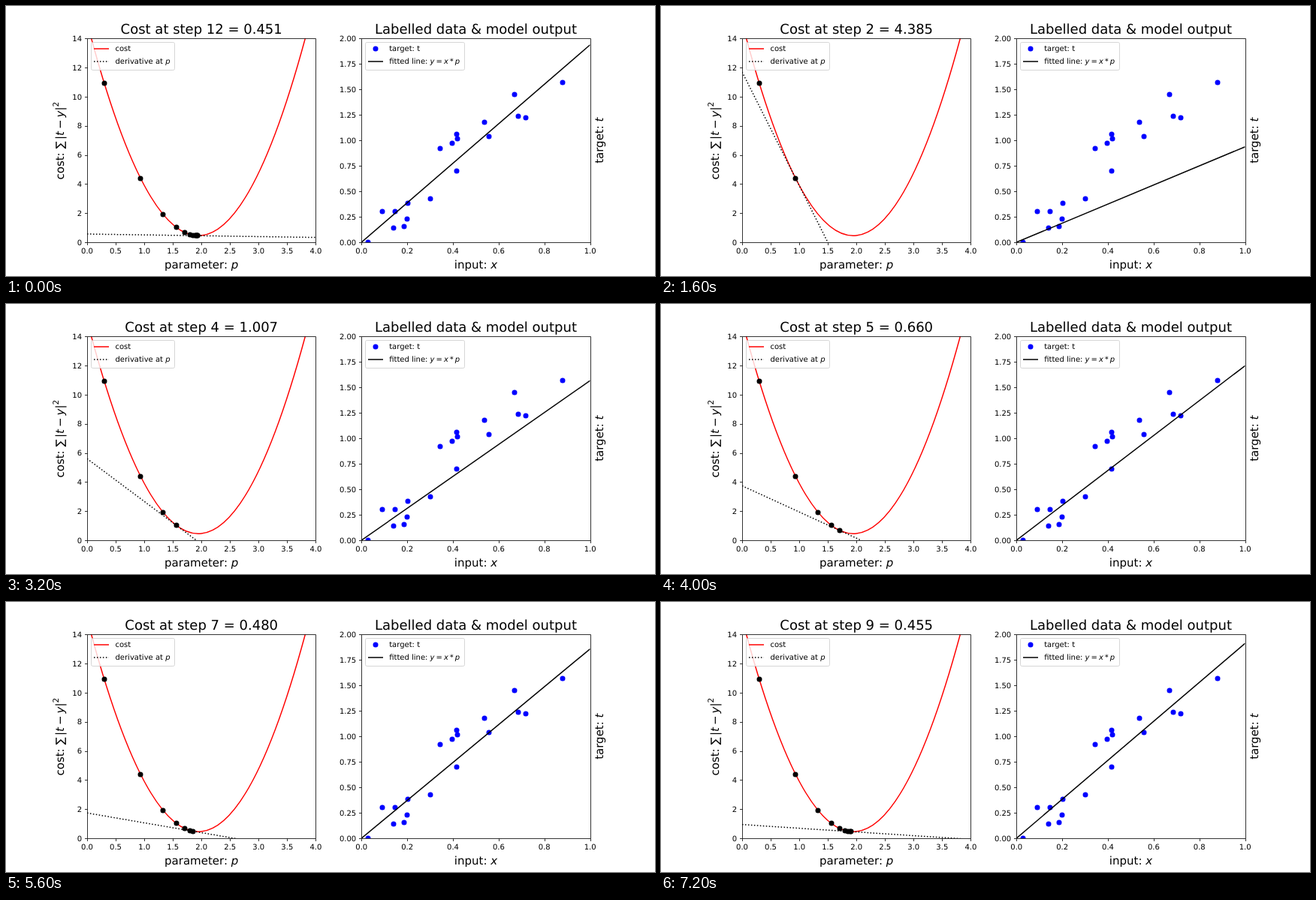
These frames come from a looping animation (864x360 px, 8000 ms). An HTML page:

```html
<!DOCTYPE html>
<html lang="en">
<head>
<meta charset="utf-8">
<title>Gradient descent</title>
<style>
  html, body { margin: 0; width: 100%; height: 100%; overflow: hidden; background: #fff; }
  svg { display: block; }
  text { font-family: "DejaVu Sans", sans-serif; font-size: 10px; text-rendering: geometricPrecision; white-space: pre; }
  .title { font-size: 18px; text-anchor: middle; }
  .label { font-size: 15px; }
  .mid { text-anchor: middle; }
  .end { text-anchor: end; }
  i, .it { font-style: italic; }
  .line { fill: none; stroke: #000; stroke-width: 1.5; }
  .red { stroke: #f00; }
  .dots { stroke-dasharray: 1.5 2.475; }
  .axis { fill: none; stroke: #000; stroke-width: .8; }
  .box { fill: #fff; fill-opacity: .8; stroke: #ccc; stroke-opacity: .8; }
</style>
</head>
<body>
<svg id="stage" width="864" height="360" viewBox="0 0 864 360"></svg>
<script>
const TOP = 43.2, BOTTOM = 315, WIDTH = 304.36;
const svg = document.getElementById("stage");

function add(parent, tag, attrs, text) {
  const el = document.createElementNS("http://www.w3.org/2000/svg", tag);
  for (const key in attrs) el.setAttribute(key, attrs[key]);
  if (text) el.textContent = text;
  parent.append(el);
  return el;
}

// Each part is [text, class, dx, dy, font size]
function rich(attrs, parts) {
  const el = add(svg, "text", attrs);
  for (const [text, cls = "", dx = 0, dy = 0, size] of parts) {
    const span = add(el, "tspan", { class: cls, dx, dy }, text);
    if (size) span.style.fontSize = size + "px";
  }
}

const dot = (parent, x, y, fill) =>
  add(parent, "circle", { cx: Math.round(x), cy: Math.round(y), r: 3.5, fill });

function makeAxes(id, left, xMax, yMax) {
  const clip = add(svg, "clipPath", { id });
  add(clip, "rect", { x: left, y: TOP, width: WIDTH, height: BOTTOM - TOP });
  return {
    left, xMax, yMax,
    x: v => left + v / xMax * WIDTH,
    y: v => BOTTOM - v / yMax * (BOTTOM - TOP),
    plot: add(svg, "g", { "clip-path": `url(#${id})` })
  };
}

const snap = v => Math.round(v) + .5;

function drawFrame(ax, xStep, yStep, yDigits) {
  const l = snap(ax.left), r = snap(ax.left + WIDTH), t = snap(TOP), b = snap(BOTTOM);
  let d = `M${l} ${t}H${r}V${b}H${l}Z`;
  for (let i = 0; i * xStep <= ax.xMax + 1e-6; i++) {
    const x = ax.x(i * xStep);
    d += `M${snap(x)} ${b}v3.5`;
    add(svg, "text", { x, y: 330, class: "mid" }, (i * xStep).toFixed(1));
  }
  for (let i = 0; i * yStep <= ax.yMax + 1e-6; i++) {
    const y = ax.y(i * yStep);
    d += `M${l} ${snap(y)}h-3.5`;
    add(svg, "text", { x: ax.left - 7, y: Math.round(y + 3.7), class: "end" }, (i * yStep).toFixed(yDigits));
  }
  add(svg, "path", { d, class: "axis" });
}

function legendBox(left, width) {
  add(svg, "rect", { x: left, y: 48.5, width, height: 37, rx: 2, class: "box" });
}

// Cost is C + A (p - BEST)^2, descended with a fixed rate
const C = .4509, A = 3.8696, BEST = 1.9448, START = .3, RATE = .05;
const cost = p => C + A * (p - BEST) ** 2;
const slope = p => 2 * A * (p - BEST);
const params = [START];
while (params.length < 12) {
  const p = params[params.length - 1];
  params.push(p - RATE * slope(p));
}

// Left chart
const left = makeAxes("clipL", 108, 4, 14);
add(left.plot, "path", {
  class: "line red",
  d: `M${left.x(0)} ${left.y(cost(0))}Q${left.x(2)} ${left.y(cost(0) + 2 * slope(0))} ${left.x(4)} ${left.y(cost(4))}`
});
const tangent = add(left.plot, "path", { class: "line dots" });
const visited = params.map(p => dot(left.plot, left.x(p), left.y(cost(p)), "#000"));
drawFrame(left, .5, 2, 0);
const title = add(svg, "text", { x: 260.2, y: 37, class: "title" });
rich({ x: 260.2, y: 350, class: "label mid" }, [["parameter: "], ["p", "it"]]);
rich({ transform: "translate(77 231.5) rotate(-90)", class: "label" }, [
  ["cost: ∑"], ["|", "", 2.5], ["t", "it"], ["−", "", 3], ["y", "it", 3], ["|"], ["2", "", 0, -7, 10.5]
]);
legendBox(113.5, 111);
add(svg, "path", { d: "M117 57h20", class: "line red" });
add(svg, "path", { d: "M117 74h20", class: "line dots" });
add(svg, "text", { x: 145.5, y: 60 }, "cost");
rich({ x: 145.5, y: 77 }, [["derivative at "], ["p", "it"]]);

// Right chart; samples are in stage pixels
const right = makeAxes("clipR", 473.24, 1, 2);
const samples = [
  [482, 315], [501, 274], [518, 274], [516, 296], [530, 294], [534, 284], [535, 263],
  [565, 257], [578, 190], [594, 183], [600, 171], [601, 177], [600, 220], [637, 155],
  [643, 174], [677, 118], [682, 147], [692, 149], [741, 102]
];
for (const [x, y] of samples) dot(right.plot, x, y, "#00f");
const fit = add(right.plot, "path", { class: "line" });
drawFrame(right, .2, .25, 2);
add(svg, "text", { x: 625.5, y: 37, class: "title" }, "Labelled data & model output");
rich({ x: 625.5, y: 350, class: "label mid" }, [["input: "], ["x", "it"]]);
rich({ transform: "translate(795 179.2) rotate(-90)", class: "label mid" }, [["target: "], ["t", "it"]]);
legendBox(478.5, 132);
dot(svg, 492, 57, "#00f");
add(svg, "path", { d: "M482 74h20", class: "line" });
add(svg, "text", { x: 510.2, y: 60 }, "target: t");
rich({ x: 510.2, y: 77 }, [
  ["fitted line: "], ["y", "it"], ["=", "", 2], ["x", "it", 2], ["*", "", 2], ["p", "it", 2]
]);

const STEPS = [12, 1, 2, 3, 4, 5, 6, 7, 8, 9], HOLD = 800;
let shown = 0;

function show(step) {
  const p = params[step - 1], value = cost(p), k = slope(p);
  title.textContent = `Cost at step ${step} = ${value.toFixed(3)}`;
  tangent.setAttribute("d", `M${left.x(0)} ${left.y(value - k * p)}L${left.x(4)} ${left.y(value + k * (4 - p))}`);
  fit.setAttribute("d", `M${right.x(0)} ${right.y(0)}L${right.x(1)} ${right.y(p)}`);
  visited.forEach((el, i) => el.setAttribute("visibility", i < step ? "visible" : "hidden"));
  shown = step;
}

const begin = performance.now();
function tick() {
  const t = performance.now() - begin;
  const step = STEPS[Math.floor(t / HOLD) % STEPS.length];
  if (step !== shown) show(step);
  requestAnimationFrame(tick);
}
tick();
</script>
</body>
</html>
```
